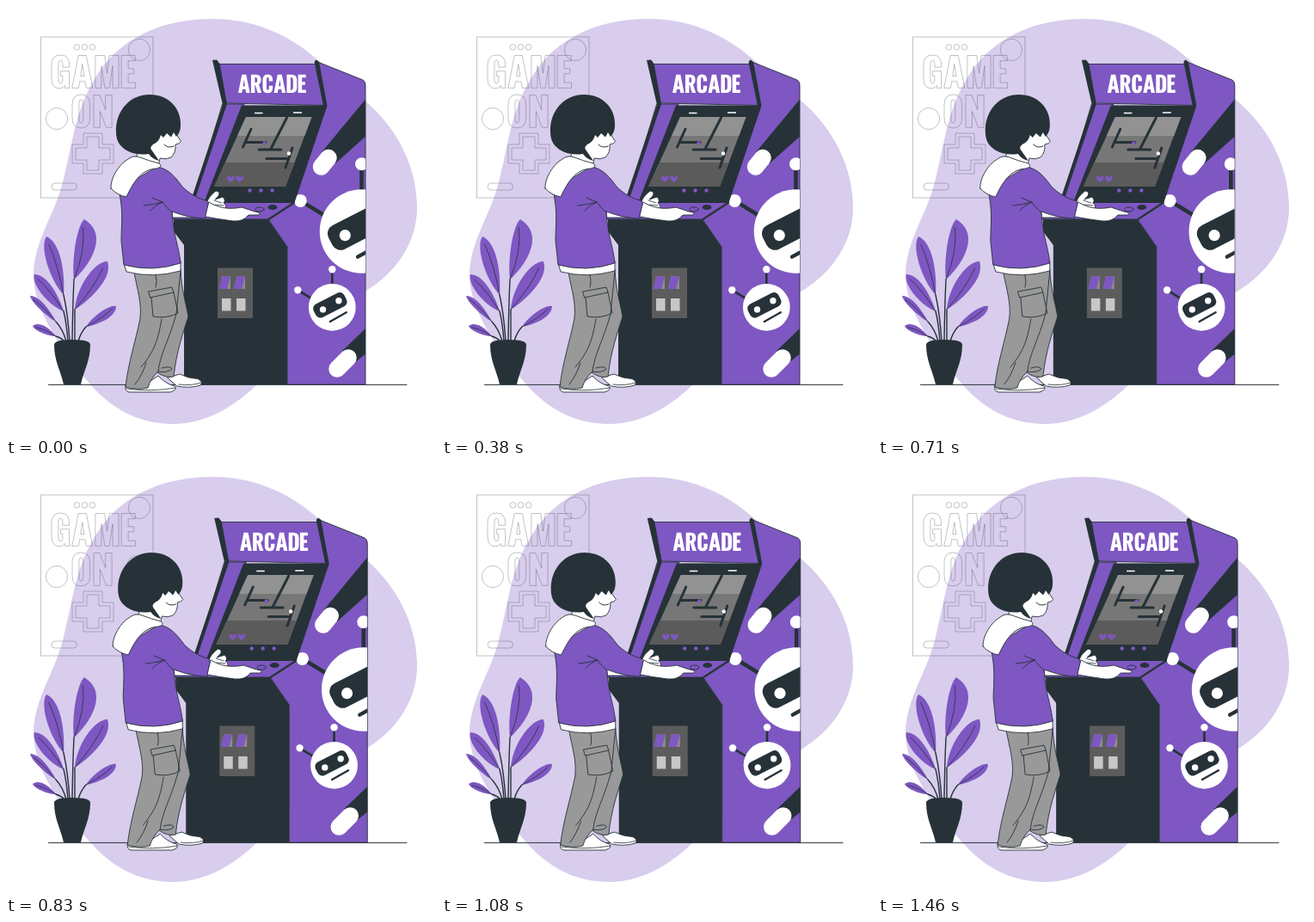
These frames come from a looping animation (500x500 px, 1.5 s). An HTML page:

```html
<!DOCTYPE html>
<html lang="en">
<head>
<meta charset="utf-8">
<title>Arcade</title>
<style>
html, body { margin: 0; width: 100%; height: 100%; overflow: hidden; background: #fff; }
svg { display: block; width: 100vw; height: 100vh; }
.p { fill: #7e57c2; }
.d { fill: #263238; }
.w { fill: #fff; }
.g { fill: #999; }
.o { stroke: #263238; stroke-width: .9; stroke-linejoin: round; stroke-linecap: round; }
.l { fill: none; stroke: #263238; stroke-linecap: round; stroke-linejoin: round; }
#poster { fill: none; stroke: #263238; stroke-opacity: .36; stroke-width: .8; }
#poster path { vector-effect: non-scaling-stroke; }
</style>
</head>
<body>
<svg viewBox="0 0 500 500" role="img" aria-label="Boy at an ARCADE machine, poster GAME ON">
  <defs>
    <clipPath id="side"><path d="M360 64L415 86Q418 88 418 92V440H327V280L305 248L334 229L372 116Z"/></clipPath>
    <clipPath id="glass"><path d="M279 129H355.500L325 210H242Z"/></clipPath>
    <g id="robot">
      <path class="l" stroke-width="2.600" d="M0 -44V-26M-40 -20L-22 -9"/>
      <circle class="w" cy="-44" r="4.200"/>
      <circle class="w" cx="-40" cy="-20" r="4.200"/>
      <circle class="w" r="27.400"/>
      <rect class="d" x="-20" y="-8.700" width="40" height="17.400" rx="6" transform="translate(-2.500 -2.500) rotate(-27)"/>
      <circle class="w" cx="-10.800" cy="2.600" r="3.700"/>
      <circle class="w" cx="7.600" cy="-7.600" r="3.700"/>
      <path class="l" stroke-width="2.400" d="M-2.500 16.700L16.500 6"/>
    </g>
  </defs>

  <path fill="#d8cded" d="M240 15C287 15 326 32 358 59C382 80 402 96 424 116C458 148 478 190 478 235C478 276 452 311 419 331C374 357 340 394 292 440C261 470 228 486 195 486C151 486 119 466 92 433C66 400 32 355 32 312C33 273 56 244 66 205C79 155 80 117 110 74C141 31 190 15 240 15Z"/>

  <g id="poster">
    <rect x="40.500" y="36" width="130.500" height="187"/>
    <circle cx="155" cy="51" r="12.600"/>
    <circle cx="59" cy="131" r="12.600"/>
    <circle cx="153" cy="119" r="12.600"/>
    <circle cx="82.300" cy="47.800" r="3.300"/><circle cx="91.400" cy="47.800" r="3.300"/><circle cx="100.500" cy="47.800" r="3.300"/>
    <path d="M90 148H112V161H125V183H112V195H90V183H77V161H90Z"/>
    <path d="M94 152H108V165H121V179H108V191H94V179H81V165H94Z"/>
    <rect x="53" y="206" width="29.500" height="8" rx="4"/>
  </g>

  <path class="l" d="M49.500 440.400H466"/>
  <g id="plant"></g>
  <path class="d" d="M56 394Q56 388 77 388Q98 388 98 394C98 413 90 425 87 440H67C64 425 56 413 56 394Z"/>

  <g id="play">
    <!-- cabinet -->
    <path class="p o" d="M360 64L415 86Q418 88 418 92V440H327V280L305 248L334 229L372 116Z"/>
    <g clip-path="url(#side)">
      <path class="d" d="M367 170L420 106V150L383 183ZM391 401L420 373V403L405 415Z"/>
      <path fill="none" stroke="#fff" stroke-width="19.500" stroke-linecap="round" d="M366.500 187L375 176.500M385 422L398 409"/>
      <use href="#robot" transform="translate(413.500 262) scale(1.780)"/>
      <use href="#robot" transform="translate(379.300 350.300)"/>
    </g>
    <path class="d" d="M195 247H304L327 280V440H207V278L195 262Z"/>
    <path class="p o" d="M230 227H336L304 248H193Z"/>
    <path class="l" stroke-width="2" d="M335 229L305 248.500"/>
    <path class="p o" d="M252 114H277L236 227H218Z"/>
    <path class="d" d="M274 115.500H372L334 229H230Z"/>
    <g clip-path="url(#glass)">
      <path fill="#777" d="M230 120H370V220H230Z"/>
      <path fill="#929292" d="M230 120H370V151H230Z"/>
      <path fill="#5b5b5b" d="M230 182H370V220H230Z"/>
    </g>
    <path class="l" stroke-width="3" d="M285 143L275.500 164M280 158.500H302M326.500 130L308 166M294 167H320M303 177.500H327M333 165L325 188"/>
    <circle class="p" cx="300.500" cy="159.500" r="2.200"/>
    <circle class="w" cx="329" cy="171.500" r="2.200"/>
    <path class="p" id="heart" d="M261 205Q256 201 257 198.500Q259.500 196.500 261.500 199.500Q264.500 196.500 266 199Q265.500 202 261 205Z"/>
    <use href="#heart" x="10.300"/>
    <path stroke="#fff" stroke-width="1.600" d="M289 124.500H298.500M334 124H344"/>
    <circle class="p" cx="283.500" cy="214.500" r="2.200"/><circle class="p" cx="296.500" cy="214.500" r="2.200"/><circle class="p" cx="309.500" cy="214.500" r="2.200"/>
    <path class="p o" d="M246 67.500H361L371 115.500L257 113Z"/>
    <path class="d" d="M240 63L245 62.500L248.500 67L257 114L221 221L217 220L252 115Z"/>
    <path class="d" d="M358.500 65L361 62.500L364 65L373.500 116L335 230L332 229L369 116Z"/>
    <g id="sign" class="w"></g>
    <ellipse class="p o" cx="295" cy="236.500" rx="5" ry="2.500"/>
    <ellipse class="d" cx="310" cy="234" rx="5.500" ry="3"/>
    <path fill="#5c5c5c" d="M246 304.500H287V363H246Z"/>
    <g id="slot">
      <path fill="#8c8c8c" d="M251 314.500H261V329H248Z"/>
      <path class="p" d="M251 314.500H261L257 329H247.500Z"/>
      <path fill="#c7c7c7" d="M251 340H261.500V354.500H251Z"/>
    </g>
    <use href="#slot" x="17"/>

    <!-- legs and shoes -->
    <path class="w o" d="M188 432L202 428Q212 433 223 433.500Q230 437 226 441Q213 445 199 442Z"/>
    <path class="g o" d="M178 366L203 306C204 330 209 344 212 361C206 380 198 402 195 431Q185 433 176 426Z"/>
    <path class="w o" d="M139 442L165 438L177 430Q185 439 196 442Q200 446 191 449H143Q138 448 139 442Z"/>
    <path class="l" stroke-width=".8" d="M140 445Q168 449 197 444M201 440Q215 442 227 438"/>
    <path class="g o" d="M149 310C153 331 158 346 156 363C151 389 142 415 139 443Q152 447 165 444Q168 433 177 425C179 405 190 388 198 358L203 308Z"/>
    <path class="l" stroke-width=".9" d="M166 332L193 327L195 333L168 339ZM169 339L171 361Q187 364 200 357L195 333M181 364C177 386 174 400 157 420M177 425Q188 427 193 422Q191 418 181 421M174 313Q176 321 174 327M163 415Q158 430 150 440"/>

    <!-- body -->
    <path class="w o" d="M193 238H225L223 246L194 246Z"/>
    <path class="w o" d="M137 299L140 309Q171 317 203 308V297Z"/>
    <path class="p o" d="M131 214C137 239 134 255 134 273L137 301Q170 310 203 299C201 279 195 269 193 239Q214 247 232 247Q237 238 236 227C222 224 212 217 205 210C197 199 189 189 176 187Z"/>
    <path class="l" stroke-width=".9" d="M193 240Q186 234 182 228Q172 231 160 232M182 228Q173 232 168 238M182 228L170 223"/>
    <path class="w o" d="M234 228Q235 222 244 215Q250 216 247 221L243 225L252 222Q256 226 253 229Q258 233 254 236L242 235Z"/>
    <path class="l" stroke-width=".8" d="M242 226L251 229M243 231L253 232"/>
    <path class="w o" d="M236 228C247 235 260 237 274 234L289 239Q297 240 294 243L282 243Q276 251 264 250Q248 248 232 245Z"/>

    <!-- head -->
    <path class="w o" d="M166 140H198V149L203.500 157.500Q202 160.500 197 161Q198 170 192 176Q186 179 179 177L177 187L150 180Z"/>
    <path class="w o" d="M122 212C121 201 131 184 142 178Q148 173 156 176Q166 180 178 183Q183 187 175 189C157 190 148 205 140 222Q129 220 122 212Z"/>
    <path class="d" d="M128 147C127 121 145 103 167 103C189 103 204 119 203 139Q203 147 198 152L195 147L192 152.500L187 148L183 153L180 150Q178 158 171 161Q167 164 169 167L176 177L178 180Q170 178 166 172C152 174 140 170 133 162Q128 156 128 147Z"/>
    <path class="l" d="M184 161Q188 166 195 163"/>
  </g>
</svg>
<script>
const $ = id => document.getElementById(id);

// Display lettering, drawn on a 22 unit cap height: [advance, outline]
const bowl = 'Q12 -.3 6 -.3Q0 -.3 0 6.500V15.500Q0 22.300 ';
const hook = 'Q4.600 18.800 4.600 16V6Q4.600 3.200 6 3.200Q7.500 3.200 7.500 6';
const glyphs = {
  A: [14, 'M0 22L4.400 0H9.600L14 22H9.600L8.800 17.600H5.200L4.400 22ZM5.800 14H8.200L7 6Z'],
  R: [12.6, 'M0 0H6Q12 0 12 6.200Q12 10.400 9.300 11.800L12.600 22H8L5.200 12.800H4.600V22H0ZM4.600 3.400V9.700H5.700Q7.500 9.700 7.500 6.400Q7.500 3.400 5.600 3.400Z'],
  C: [12, `M12 8V6.500${bowl}6 22.300Q12 22.300 12 15.500V13.500H7.500V16Q7.500 18.800 6 18.800${hook}V8Z`],
  D: [12.2, 'M0 0H5.500Q12.200 0 12.200 6.500V15.500Q12.200 22 5.500 22H0ZM4.600 3.500V18.500H5.400Q7.600 18.500 7.600 15.800V6.200Q7.600 3.500 5.400 3.500Z'],
  E: [9.5, 'M0 0H9.300V3.600H4.600V8.900H8.400V12.400H4.600V18.400H9.500V22H0Z'],
  G: [12, `M12 8V6.500${bowl}5.300 22.300Q7.800 22.300 8.800 20.300L9.100 22H12V10.600H6.200V13.900H7.500V16Q7.500 18.800 6 18.800${hook}V8Z`],
  M: [15.8, 'M0 0H6.300L7.900 12L9.500 0H15.800V22H11.700V7L9.400 22H6.400L4.100 7V22H0Z'],
  O: [12.2, `M12 15.500V6.500${bowl}6 22.300Q12 22.300 12 15.500ZM7.500 16Q7.500 18.800 6 18.800${hook}Z`],
  N: [12.3, 'M0 0H4L8 10V0H12.300V22H8.500L4.300 11V22H0Z']
};

function word(host, text, x, y, size, gap) {
  let out = '';
  for (const ch of text) {
    const [adv, d] = glyphs[ch];
    out += `<path fill-rule="evenodd" transform="translate(${x} ${y}) scale(${size})" d="${d}"/>`;
    x += (adv + gap) * size;
  }
  $(host).insertAdjacentHTML('beforeend', out);
}
word('poster', 'GAME', 53, 57.5, 1.72, 1.8);
word('poster', 'ON', 77, 103.5, 1.72, 2.3);
word('sign', 'ARCADE', 270, 79.7, 0.97, 1.4);

// Leaf, full near the tip and tapering to its base; a and b are the bulges of the two sides
function leaf(tx, ty, bx, by, a, b, foot) {
  const dx = bx - tx, dy = by - ty, n = Math.hypot(dx, dy);
  const at = (k, s) => `${tx + dx * k - dy / n * s} ${ty + dy * k + dx / n * s}`;
  return `<path class="p" d="M${tx} ${ty}C${at(.12, a)} ${at(.68, a)} ${bx} ${by}C${at(.8, -b * .5)} ${at(.2, -b * 1.5)} ${tx} ${ty}Z"/>` +
    `<path class="l" stroke-width=".8" d="M${at(.14, 0)}Q${at(.5, -b * .35)} ${bx} ${by}"/>` +
    `<path class="l" stroke-width="1.400" d="M${bx} ${by}Q${foot - (foot - bx) * .3} ${by + (390 - by) * .4} ${foot} 390"/>`;
}
$('plant').innerHTML =
  leaf(91, 248, 79, 318, 7, 23, 77) +
  leaf(47, 268, 67, 336, 11, 11, 74) +
  leaf(118, 297, 80, 353, 13, 12, 80) +
  leaf(33, 312, 67, 355, 10, 9, 72) +
  leaf(28, 337, 58, 367, 4, 6, 70) +
  leaf(128, 349, 93, 373, 6, 8, 84) +
  leaf(31, 372, 58, 384, 4, 7, 68);

// Shake: growing and fading sway, linear between stops, at 24 pictures a second
const loop = 1500, step = 1000 / 24;
const stops = [0, -1, 2, -4, 4, -4, 4, -4, 2, -1, 0];

function sway(ms) {
  const p = (ms / loop % 1) * 10, i = Math.floor(p);
  return stops[i] + (stops[i + 1] - stops[i]) * (p - i);
}

function draw(ms) {
  const tick = Math.floor((ms % loop + 6) / step) % 36;
  const x = sway(tick * step + 30) + 0.2;
  $('play').setAttribute('transform', `translate(${x.toFixed(2)} 0)`);
}

let start;
function run(now) {
  start ??= now;
  draw(now - start);
  requestAnimationFrame(run);
}
draw(0);
requestAnimationFrame(run);
</script>
</body>
</html>
```
